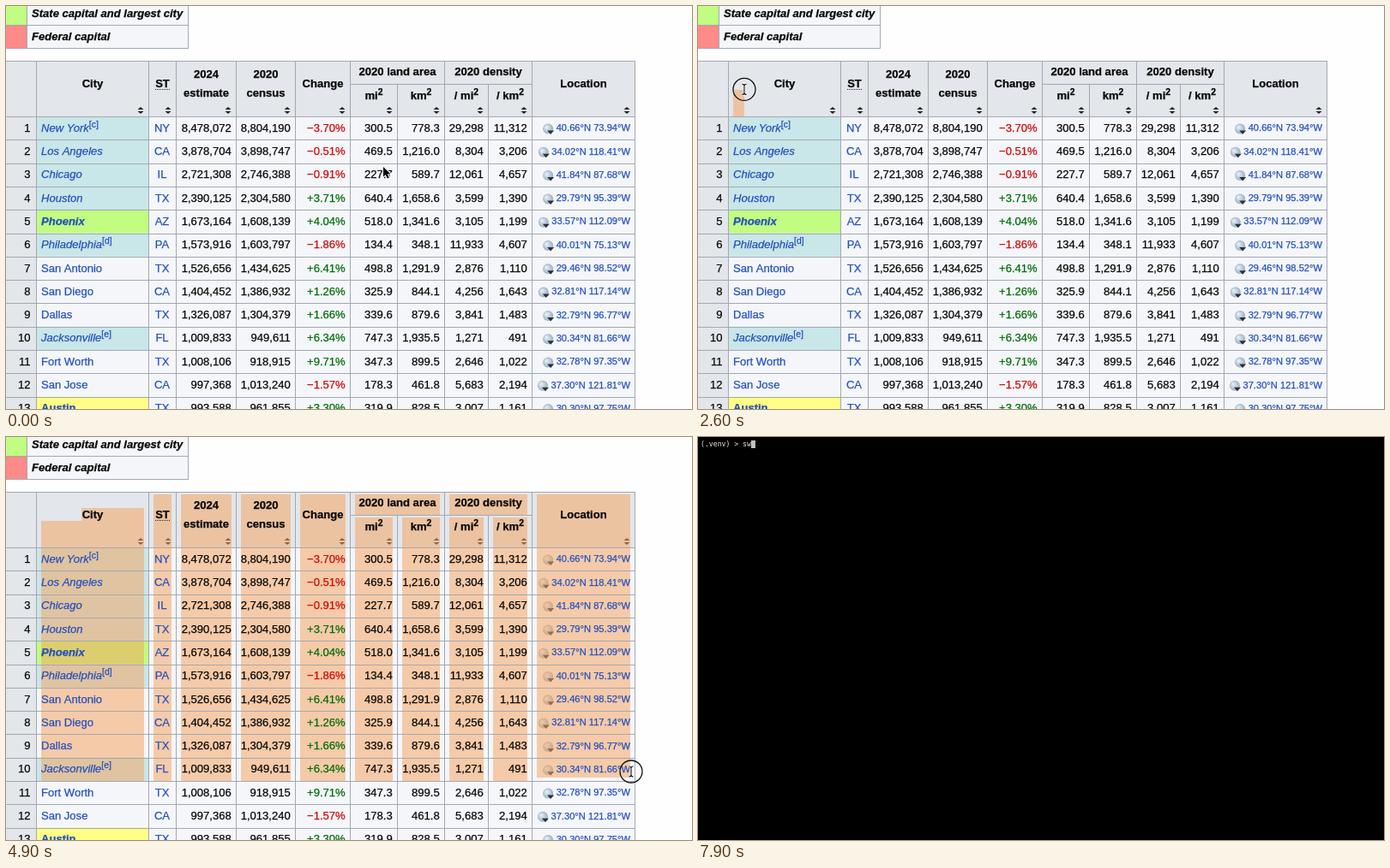
An HTML page with a canvas for the animation above (8 s loop, 800 by 471 pixels).

```html
<!DOCTYPE html>
<html lang="en">
<head>
<meta charset="utf-8">
<title>Selecting a table</title>
<style>
  html, body { margin: 0; height: 100%; overflow: hidden; background: #fefefe; }
  canvas { display: block; }
</style>
</head>
<body>
<canvas id="stage" width="800" height="471"></canvas>
<script>
const ctx = document.getElementById('stage').getContext('2d');
const LOOP = 8000, STEP = 100;
const LINE = '#a2a9b1', HEAD = '#e3e6ea', CELL = '#f5f6fa', LINK = '#2450bd';
const TINT = 'rgba(246,164,94,.52)';
const SANS = '"Liberation Sans", Arial, sans-serif';
const MONO = '"DejaVu Sans Mono", monospace';

// Table geometry: column edges, header top, first row, row pitch
const EDGES = [35, 166, 198, 268, 337, 401, 456, 511, 562, 613, 733];
const TOP = 64, SPLIT = 91, BODY = 129, ROW = 27.3;
const rowTop = i => BODY + i * ROW;

const HEADERS = [
  // lines, first column, last column, top, bottom
  [['City'], 0, 0, TOP, BODY], [['ST'], 1, 1, TOP, BODY],
  [['2024', 'estimate'], 2, 2, TOP, BODY], [['2020', 'census'], 3, 3, TOP, BODY],
  [['Change'], 4, 4, TOP, BODY],
  [['2020 land area'], 5, 6, TOP, SPLIT], [['2020 density'], 7, 8, TOP, SPLIT],
  [['mi^2'], 5, 5, SPLIT, BODY], [['km^2'], 6, 6, SPLIT, BODY],
  [['/ mi^2'], 7, 7, SPLIT, BODY], [['/ km^2'], 8, 8, SPLIT, BODY],
  [['Location'], 9, 9, TOP, BODY]
];

const KINDS = {
  plain: ['', CELL],
  largest: ['italic', '#c9e6e8'],
  both: ['italic bold', '#c1fd80'],
  capital: ['bold', '#fffe86']
};

// kind | city | state | estimate | census | square miles | location
const cities = `
largest|New York^[c]|NY|8478072|8804190|300.5|40.66°N 73.94°W
largest|Los Angeles|CA|3878704|3898747|469.5|34.02°N 118.41°W
largest|Chicago|IL|2721308|2746388|227.7|41.84°N 87.68°W
largest|Houston|TX|2390125|2304580|640.4|29.79°N 95.39°W
both|Phoenix|AZ|1673164|1608139|518.0|33.57°N 112.09°W
largest|Philadelphia^[d]|PA|1573916|1603797|134.4|40.01°N 75.13°W
plain|San Antonio|TX|1526656|1434625|498.8|29.46°N 98.52°W
plain|San Diego|CA|1404452|1386932|325.9|32.81°N 117.14°W
plain|Dallas|TX|1326087|1304379|339.6|32.79°N 96.77°W
largest|Jacksonville^[e]|FL|1009833|949611|747.3|30.34°N 81.66°W
plain|Fort Worth|TX|1008106|918915|347.3|32.78°N 97.35°W
plain|San Jose|CA|997368|1013240|178.3|37.30°N 121.81°W
capital|Austin|TX|993588|961855|319.9|30.30°N 97.75°W`.trim().split('\n').map(line => {
  const [kind, name, state, estimate, census, miles, place] = line.split('|');
  const KM2 = 2.589988, change = (estimate / census - 1) * 100;
  const density = Math.round(census / miles);
  const group = (n, digits = 0) => n.toLocaleString('en-US',
    { minimumFractionDigits: digits, maximumFractionDigits: digits });
  return {
    kind, name, state, place, change,
    numbers: [group(+estimate), group(+census),
      (change < 0 ? '−' : '+') + Math.abs(change).toFixed(2) + '%',
      miles, group(miles * KM2, 1), group(density), group(density / KM2)]
  };
});

function rect(x, y, x2, y2, color) {
  ctx.fillStyle = color;
  ctx.fillRect(x, y, x2 - x, y2 - y);
}
const hLine = (y, x, x2) => rect(x, Math.round(y), x2, Math.round(y) + 1, LINE);
const vLine = (x, y, y2) => rect(x, y, x + 1, y2, LINE);

// A hairline outline gives the text its slightly heavier weight
function ink(text, x, y, font, color) {
  ctx.font = font;
  ctx.fillStyle = ctx.strokeStyle = color;
  ctx.lineWidth = .25;
  ctx.fillText(text, x, y);
  ctx.strokeText(text, x, y);
}

// Writes a label; the part after ^ is raised
function write(label, x, y, { align = 0, style = '', raisedStyle = style, size = 13.05, color = '#080808' } = {}) {
  const [main, raised = ''] = label.split('^');
  const mainFont = `${style} ${size}px ${SANS}`, raisedFont = `${raisedStyle} 10.4px ${SANS}`;
  ctx.font = raisedFont;
  const raisedWidth = ctx.measureText(raised).width;
  ctx.font = mainFont;
  const mainWidth = ctx.measureText(main).width;
  x -= align * (mainWidth + raisedWidth);
  ink(main, x, y, mainFont, color);
  if (raised) ink(raised, x + mainWidth, y - 5, raisedFont, color);
}

function polygon(points, x, y, fill, stroke, width = 1) {
  ctx.beginPath();
  points.forEach(([px, py]) => ctx.lineTo(x + px, y + py));
  ctx.closePath();
  if (stroke) {
    ctx.strokeStyle = stroke;
    ctx.lineWidth = width;
    ctx.stroke();
  }
  ctx.fillStyle = fill;
  ctx.fill();
}

function sortIcon(x, y) {
  polygon([[-3.5, -1], [0, -4], [3.5, -1]], x, y, '#222');
  polygon([[-3.5, 1], [0, 4], [3.5, 1]], x, y, '#222');
}

function globe(x, y) {
  const shade = ctx.createRadialGradient(x - 2, y - 2, 1, x, y, 6.5);
  shade.addColorStop(0, '#e0ecf4');
  shade.addColorStop(1, '#94aabd');
  ctx.fillStyle = shade;
  ctx.beginPath();
  ctx.arc(x, y, 6, 0, 7);
  ctx.fill();
  polygon([[-1, 2], [7, 2], [3, 6.5]], x, y, '#26323c');
}

function drawCells() {
  rect(0, 0, 800, 471, '#fefefe');
  rect(0, 0, 212, 50, CELL);
  rect(0, 0, 24, 22, '#c1fd80');
  rect(0, 22, 24, 50, '#ff8a8a');
  hLine(22, 0, 213);
  hLine(49, 0, 213);
  vLine(24, 0, 50);
  vLine(212, 0, 50);

  rect(0, TOP, 733, BODY, HEAD);
  rect(0, BODY, 35, 471, HEAD);
  rect(35, BODY, 733, 471, CELL);
  cities.forEach(({ kind, place }, i) => {
    const y = rowTop(i);
    rect(35, y, 166, y + ROW, KINDS[kind][1]);
    ctx.font = `11.15px ${SANS}`;
    globe(728 - ctx.measureText(place).width - 9.5, y + 14.5);
    hLine(y, 0, 733);
  });
  hLine(TOP, 0, 733);
  hLine(SPLIT, 401, 613);
  EDGES.forEach((x, i) => {
    vLine(x, i === 6 || i === 8 ? SPLIT : TOP, 471);
    if (i) sortIcon(x - 9, 122);
  });
}

function drawSelection([headX, headY]) {
  const headRow = Math.floor((headY - BODY) / ROW);
  const fill = (row, first, last, y, y2, left = EDGES[first] + 6) => {
    const right = EDGES[last + 1] - 5;
    const end = row < headRow ? right : Math.min(right, headX);
    if (end > left) rect(left, y, end, y2, TINT);
  };
  HEADERS.forEach(([lines, first, last, top, bottom]) => {
    if (lines[0] === 'City') {
      fill(-1, 0, 0, 83, 98, 88);
      fill(-1, 0, 0, 98, BODY);
    } else {
      fill(-1, first, last, top + 3, bottom);
    }
  });
  for (let row = 0; row <= headRow; row++) {
    const y = Math.round(rowTop(row)), next = Math.round(rowTop(row + 1));
    for (let col = 0; col < 10; col++) {
      fill(row, col, col, y + 1, row === headRow && col === 9 ? y + 23 : next);
    }
  }
}

function drawText() {
  write('State capital and largest city', 30, 12.5, { style: 'italic bold' });
  write('Federal capital', 30, 40, { style: 'italic bold' });

  HEADERS.forEach(([lines, first, last, top, bottom]) => {
    const x = (EDGES[first] + EDGES[last + 1]) / 2 + .5;
    const base = bottom === SPLIT ? 81 : top === SPLIT ? 109 : lines[1] ? 84 : 95;
    lines.forEach((line, i) => write(line, x, base + 21.5 * i, { align: .5, style: 'bold' }));
  });
  for (let x = 174; x < 191; x += 2) rect(x, 97, x + 1, 98, '#222');

  cities.forEach(({ kind, name, state, numbers, place, change }, i) => {
    const y = rowTop(i) + 17.7;
    write(String(i + 1), 28.5, y, { align: 1 });
    write(name, 41, y, { style: KINDS[kind][0], raisedStyle: '', color: LINK });
    write(state, 182, y, { align: .5, color: LINK });
    numbers.forEach((text, n) => write(text, EDGES[n + 3] - 5.3, y,
      { align: 1, color: n !== 2 ? '#080808' : change < 0 ? '#cc0a0a' : '#006c08' }));
    write(place, 728, y - .5, { align: 1, size: 11.15, color: LINK });
  });
}

// Pointer path: time, x, y
const PATH = [[0, 440, 188], [1700, 22, 85], [2500, 22, 85], [3200, 599, 309],
  [3900, 709, 383], [4200, 709, 383], [4400, 729, 391], [LOOP, 729, 391]];
// Button down and up
const PRESSES = [[2100, 4000], [4400, 5250]];

function pointerAt(t) {
  const i = PATH.findIndex(key => t < key[0]);
  const [t0, x0, y0] = PATH[i - 1], [t1, x1, y1] = PATH[i];
  const p = (t - t0) / (t1 - t0), ease = p * p * (3 - 2 * p);
  return [x0 + (x1 - x0) * ease, y0 + (y1 - y0) * ease];
}

function drawRing(t, x, y) {
  for (const [down, up] of PRESSES) {
    if (t < down || t > up + 250) continue;
    const radius = t < up ? Math.max(13, 25 - (t - down) * .05) : 13 + (t - up) * .06;
    ctx.strokeStyle = '#111';
    ctx.lineWidth = 1.3;
    ctx.beginPath();
    ctx.arc(x, y, radius, 0, 7);
    ctx.stroke();
  }
}

function drawPointer(t, x, y) {
  if (t < 2500) {
    polygon([[0, 0], [0, 11.5], [2.7, 9.2], [4.7, 13.6], [6.8, 12.7], [4.8, 8.4], [8.3, 8.2]],
      x, y, '#000', '#fff', 2);
  } else if (t >= 4000 && t < 4400) {
    polygon([[-1, 1], [1, 1], [1.5, 5], [6.5, 6.5], [7, 9], [5.5, 14], [0, 14], [-4, 8.5], [-3, 7.5], [-1, 9]],
      x, y, '#fff', '#000', 1.6);
  } else {
    const beam = new Path2D(`M${x - 2.5} ${y - 6}q2.5 0 2.5 2v8q0 2 -2.5 2M${x + 2.5} ${y - 6}q-2.5 0 -2.5 2v8q0 2 2.5 2`);
    for (const [color, width] of [['#fff', 2.6], ['#111', 1.1]]) {
      ctx.strokeStyle = color;
      ctx.lineWidth = width;
      ctx.stroke(beam);
    }
  }
}

function drawTerminal(t) {
  const prompt = '(.venv) > ' + (t < 7600 ? '' : t < 7900 ? 's' : 'sw');
  ctx.font = `8.17px ${MONO}`;
  rect(0, 0, 800, 471, '#000');
  ctx.fillStyle = '#e4e4e4';
  ctx.fillText(prompt, 3, 11);
  const x = 3 + ctx.measureText(prompt).width;
  rect(x, 4, x + 5, 13, '#c2c2c2');
}

function draw(now) {
  const t = Math.floor(now % LOOP / STEP) * STEP;
  const shown = Math.min(1, Math.max(0, (t - 6300) / 400));
  if (shown < 1) {
    const [x, y] = pointerAt(t);
    drawCells();
    if (t >= 2500) drawSelection(pointerAt(t < 4400 ? Math.min(t, 4000) : t));
    drawText();
    drawRing(t, x, y);
    drawPointer(t, x, y);
  }
  ctx.globalAlpha = shown;
  if (shown) drawTerminal(t);
  ctx.globalAlpha = 1;
}

const start = performance.now();
(function frame() {
  draw(performance.now() - start);
  requestAnimationFrame(frame);
})();
</script>
</body>
</html>
```
